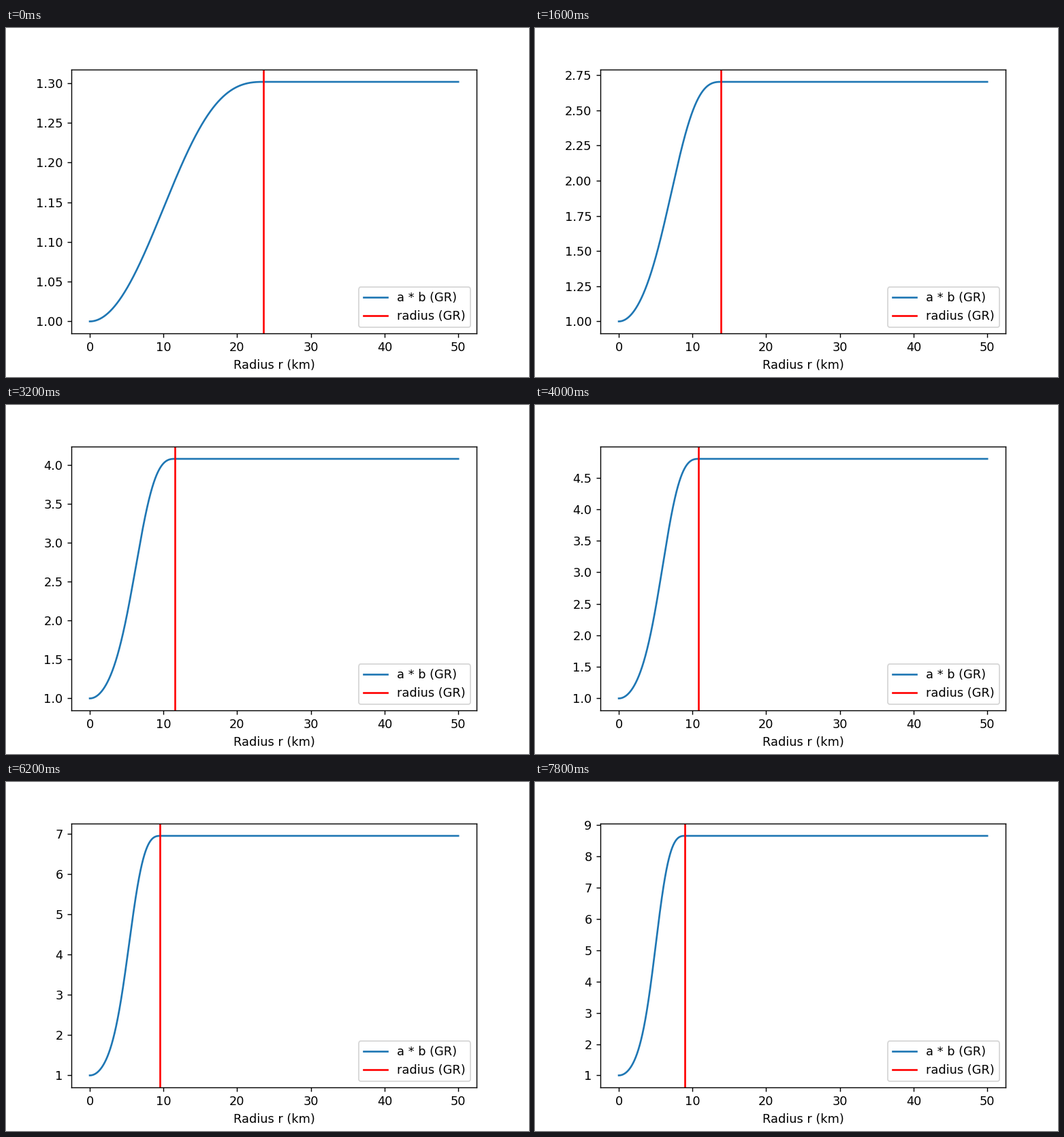
Animation, 768 px wide and 512 px high, one loop 8000 ms. Source, as a matplotlib script:

```python
import numpy as np
import matplotlib.pyplot as plt
from matplotlib.animation import FuncAnimation

# Relativistic star with P = K * rho^(5/3), for a rising central density
FRAMES = 40
INTERVAL = 200
R_MAX = 50.0            # km
STEPS = 2500
UNIT = 1.3239e-6        # G/c^4 * MeV/fm^3, in km^-2
K = 1.475e-3            # (MeV/fm^3)^(-2/3)

density = 100.0 * (1 + np.arange(FRAMES))
sigma = K * density ** (2 / 3)
rho_c = UNIT * density


def slopes(r, y):
    """Derivatives of theta, mass and ln(a*b); theta = (P/Pc)^(2/5)."""
    theta, mass, _ = y
    t = np.maximum(theta, 0)
    rho = rho_c * t ** 1.5
    p = sigma * rho * t
    gap = r - 2 * mass
    d_theta = -(1 + sigma * t) * (mass + 4 * np.pi * r**3 * p) / (2.5 * sigma * r * gap)
    d_mass = 4 * np.pi * r**2 * rho
    d_log = 8 * np.pi * r**2 * (rho + p) / gap
    return np.array([d_theta, d_mass, d_log])


def solve():
    r = np.linspace(0, R_MAX, STEPS + 1)
    r[0] = 1e-6
    y = np.zeros((STEPS + 1, 3, FRAMES))
    y[0, 0] = 1
    for i in range(STEPS):
        h = r[i + 1] - r[i]
        k1 = slopes(r[i], y[i])
        k2 = slopes(r[i] + h / 2, y[i] + h / 2 * k1)
        k3 = slopes(r[i] + h / 2, y[i] + h / 2 * k2)
        k4 = slopes(r[i + 1], y[i] + h * k3)
        y[i + 1] = y[i] + h / 6 * (k1 + 2 * k2 + 2 * k3 + k4)
    return r, y[:, 0], np.exp(y[:, 2])


def surface(r, theta):
    j = np.argmax(theta <= 0)
    return r[j - 1] + (r[j] - r[j - 1]) * theta[j - 1] / (theta[j - 1] - theta[j])


r, theta, product = solve()
radii = [surface(r, theta[:, n]) for n in range(FRAMES)]

fig, ax = plt.subplots(figsize=(6, 4), dpi=128)
fig.subplots_adjust(left=0.125, right=0.9, bottom=0.125, top=0.88)
curve, = ax.plot(r, product[:, 0], color="C0", label="a * b (GR)")
edge = ax.axvline(radii[0], color="r", label="radius (GR)")
ax.set_xlim(-0.05 * R_MAX, 1.05 * R_MAX)
ax.set_xlabel("Radius r (km)")
ax.legend(loc="lower right")


def draw(n):
    ab = product[:, n]
    curve.set_ydata(ab)
    edge.set_xdata([radii[n]] * 2)
    pad = 0.05 * (ab[-1] - 1)
    ax.set_ylim(1 - pad, ab[-1] + pad)
    return curve, edge


anim = FuncAnimation(fig, draw, frames=FRAMES, interval=INTERVAL,
                     repeat=True, repeat_delay=0, blit=False)
plt.show()
```
